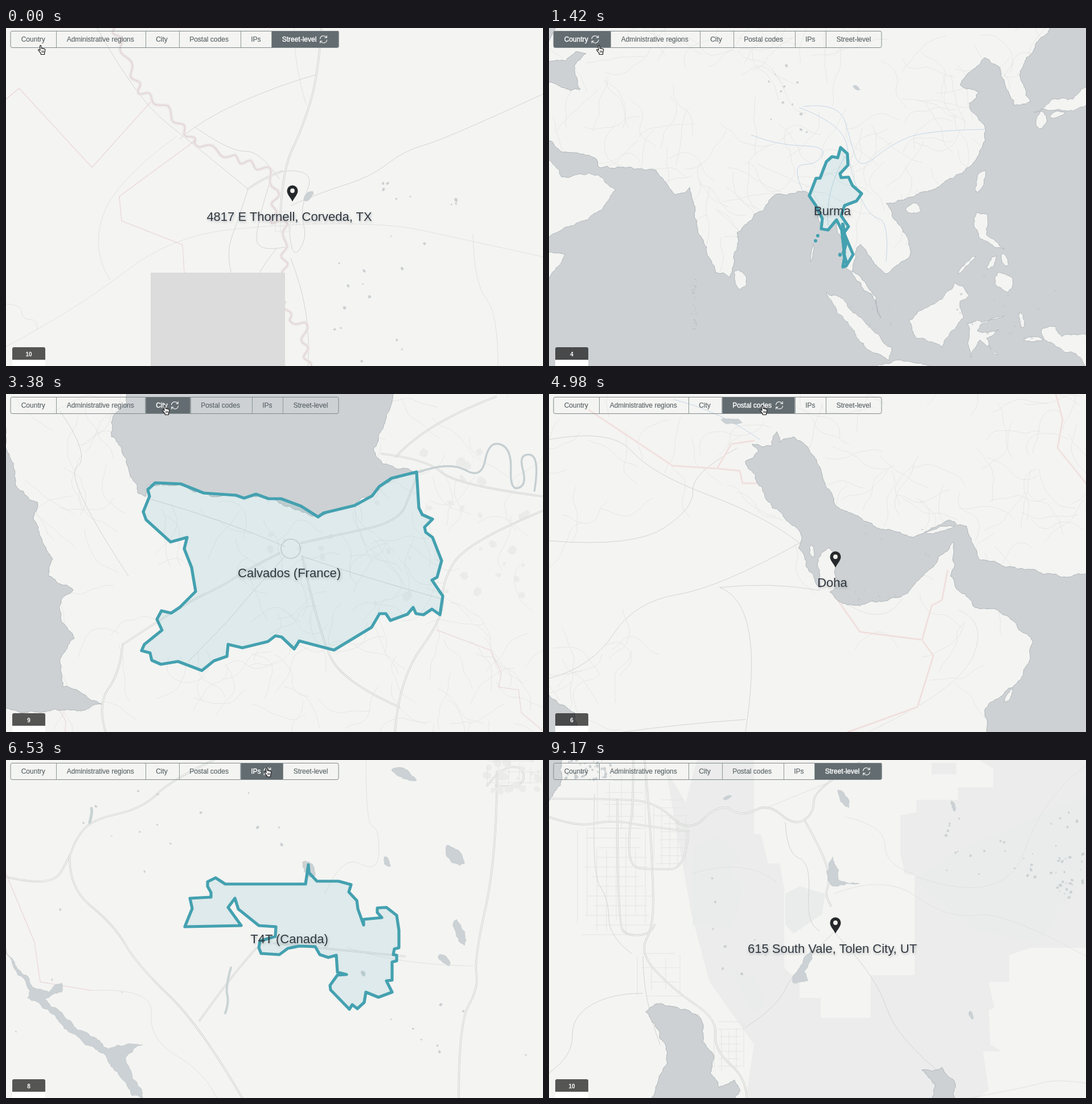
These frames come from a looping animation (943x594 px, 9.86 s). An HTML page:

```html
<!DOCTYPE html>
<html lang="en">
<head>
<meta charset="utf-8">
<title>Map layers</title>
<style>
html, body { margin: 0; width: 100%; height: 100%; overflow: hidden; background: #dcdcdc; }
svg { display: block; width: 100vw; height: 100vh; font-family: "Liberation Sans", Arial, sans-serif; }
.label { font-size: 22px; fill: #303840; text-anchor: middle; filter: drop-shadow(1px 2px 2px rgba(30, 40, 50, .3)); }
.bar text { font-size: 12px; fill: #596265; stroke: #596265; stroke-width: .15; }
.bar .on { fill: #fff; stroke: #fff; stroke-width: .4; }
.zoom { font-size: 10px; font-weight: bold; fill: #fff; text-anchor: middle; }
path { stroke-linejoin: round; stroke-linecap: round; }
</style>
</head>
<body>
<svg id="stage" viewBox="0 0 943 594"></svg>
<script>
const W = 943, H = 594, LOOP = 9860;
const LAND = '#f4f4f2', SEA = '#cdd1d4', COAST = '#a9b0b4', TEAL = '#44a1b0', GAP = '#dcdcdc';

let seed = 1, out = '';
const rnd = () => {
  seed = (seed * 16807) % 2147483647;
  return seed / 2147483647;
};
const fix = v => v.toFixed(1);
const pts = s => s.match(/\S+ \S+/g).map(q => q.split(' ').map(Number));
const poly = p => 'M' + p.map(q => q.map(fix)).join('L');
const outside = ([x, y]) => x < 0 || y < 0 || x > W || y > H;

// Coastline: midpoint displacement
function split(a, b, list) {
  const dx = b[0] - a[0], dy = b[1] - a[1], len = Math.hypot(dx, dy);
  if (len < 5 || (outside(a) && outside(b))) return list.push(b);
  const k = (rnd() - .5) * Math.min(.3, 9 / len);
  const m = [(a[0] + b[0]) / 2 - dy * k, (a[1] + b[1]) / 2 + dx * k];
  split(a, m, list);
  split(m, b, list);
}
function rough(p) {
  const list = [];
  p.forEach((a, i) => split(a, p[(i + 1) % p.length], list));
  return poly(list) + 'Z';
}
function smooth(p) {
  if (p.length < 3) return poly(p);
  let d = 'M' + p[0].map(fix);
  for (let i = 1; i < p.length - 1; i++) {
    const a = p[i], b = p[i + 1], end = i === p.length - 2;
    d += 'Q' + a.map(fix) + ' ' + (end ? b : [(a[0] + b[0]) / 2, (a[1] + b[1]) / 2]).map(fix);
  }
  return d;
}
// Sine wave carried along a polyline
function meander(p, amp) {
  const list = [];
  let s = 0;
  for (let i = 1; i < p.length; i++) {
    const [x, y] = p[i - 1], dx = p[i][0] - x, dy = p[i][1] - y, len = Math.hypot(dx, dy);
    for (let t = 0; t < len; t += 3, s += 3) {
      const o = Math.sin(s / 6 + Math.sin(s / 19)) * amp / len;
      list.push([x + dx * t / len - dy * o, y + dy * t / len + dx * o]);
    }
  }
  return poly(list);
}
function ring(x, y, rx, ry, deg, n = 9) {
  const c = Math.cos(deg * Math.PI / 180), s = Math.sin(deg * Math.PI / 180);
  return Array.from({ length: n }, (_, i) => {
    const a = i / n * 2 * Math.PI, r = .8 + rnd() * .4, u = Math.cos(a) * rx * r, v = Math.sin(a) * ry * r;
    return [x + u * c - v * s, y + u * s + v * c];
  });
}
const put = (d, stroke, w = 1, fill = 'none', more = '') =>
  out += `<path d="${d}" stroke="${stroke}" stroke-width="${w}" fill="${fill}" ${more}/>`;
const dotted = 'stroke-dasharray=".1 3"';

const sea = s => put(rough(pts(s)), COAST, .9, SEA);
const land = s => put(rough(pts(s)), COAST, .8, LAND);
const isle = (...a) => put(rough(ring(...a)), COAST, .8, LAND);
const lake = (...a) => put(rough(ring(...a)), '#bcc4c8', .6, '#cbd1d4');
const water = s => put(rough(pts(s)), '#bcc4c8', .6, '#cbd1d4');
const park = (s, tone = '#ebeceb') => put(poly(pts(s)) + 'Z', 'none', 0, tone);
const road = s => put(smooth(pts(s)), '#d3d5d4');
const lane = s => put(smooth(pts(s)), '#dfe0df', .9);
const highway = s => { const d = smooth(pts(s)); put(d, '#cccfce', 3.2); put(d, LAND, 1.6); };
const river = (s, tone = '#c3d6e8', w = 1) => put(smooth(pts(s)), tone, w);
const border = s => { const d = poly(pts(s)); put(d, '#f3e9e7', 3.5); put(d, '#ead3d0', .9); };
const dots = s => put(poly(pts(s)), '#e2c6c5', 1.7, 'none', dotted);
const bends = s => { const d = meander(pts(s), 5.5); put(d, '#ebe9e8', 6); put(d, '#dcbcbc', 1.7, 'none', dotted); };
const area = s => put(poly(pts(s)) + 'Z', TEAL, 5.2, 'rgba(68,161,176,.12)');
const thick = s => put(poly(pts(s)), TEAL, 6);

function web(x, y, w, h, n) {
  let d = '';
  while (n--) {
    let px = x + rnd() * w, py = y + rnd() * h, turn = rnd() * 6.28;
    const p = [];
    for (let i = 0; i < 9; i++) {
      p.push([px, py]);
      turn += (rnd() - .5) * 1.3;
      px += Math.cos(turn) * 13;
      py += Math.sin(turn) * 13;
    }
    d += smooth(p);
  }
  put(d, '#e3e4e3', .8);
}
function scatter(x, y, w, h, n, size) {
  let d = '';
  while (n--) {
    const r = size * (.4 + rnd());
    d += poly(ring(x + rnd() * w, y + rnd() * h, r, r * .8, rnd() * 180, 6)) + 'Z';
  }
  return d;
}
const ponds = (...a) => put(scatter(...a, 2.2), '#c3c9cc', .4, '#cbd0d3');
const towns = (...a) => put(scatter(...a, 7), 'none', 0, '#ebecea');
const islets = (...a) => put(scatter(...a, 1.6), COAST, .6, '#e6e8e8');
function grid(x, y, w, h, step) {
  let d = '';
  for (let i = 0; i <= w; i += step) d += `M${x + i} ${y + rnd() * h * .3}V${y + h - rnd() * h * .2}`;
  for (let j = 0; j <= h; j += step) d += `M${x + rnd() * w * .3} ${y + j}H${x + w - rnd() * w * .2}`;
  put(d, '#e2e3e2', .9);
}

function borderTown() {
  road('160 0 230 125 330 205 425 283');
  road('545 82 480 100 345 160 305 195');
  road('943 116 770 196 700 215 640 262 555 288 500 312');
  road('333 175 395 218 445 215 480 265');
  road('425 283 405 345 387 392 395 430');
  highway('425 283 450 264 484 252');
  road('484 252 545 245 515 320 530 370 500 410 497 345');
  lane('0 560 130 490 290 365 500 343 680 345 760 362 943 402');
  lane('820 362 822 450 864 500 864 594');
  lane('300 190 190 270 150 390 182 442');
  lane('506 0 505 60 527 135');
  road('465 265 440 345 440 395 490 385');
  road('500 405 538 500 530 594');
  road('475 388 460 405 445 430');
  lane('0 485 27 486 28 512 55 512 55 530');
  highway('554 0 548 85 521 175 485 250 482 330');
  grid(473, 322, 28, 40, 9);
  bends('190 0 235 110 280 140 330 200 400 228 460 250 475 285 468 338 494 345 488 385 490 430');
  bends('490 482 498 512 524 520 524 555 531 594');
  dots('0 125 23 106 151 245 254 130');
  dots('332 198 199 296 203 339 310 381 313 430');
  lake(530, 296, 11, 5, -45);
  ponds(655, 270, 60, 35, 6);
  ponds(770, 295, 25, 20, 4);
  ponds(575, 360, 160, 230, 14);
  out += `<rect x="254" y="430" width="236" height="164" fill="${GAP}"/>`;
}

function asia() {
  web(0, 0, 943, 330, 125);
  web(240, 230, 400, 150, 32);
  river('355 188 400 206 490 208 470 240 425 240 446 288');
  river('447 138 510 130 530 200 545 250 600 205 660 180 765 178');
  river('440 140 520 170 528 250 560 330 598 340 592 410');
  river('520 225 485 285 490 347');
  sea('-9 188 18 214 80 228 88 245 188 250 222 293 247 280 260 340 292 430 318 438 330 390 330 360 395 295 455 290 480 355 505 342 516 375 520 420 552 460 575 480 582 510 574 472 532 428 547 380 590 432 607 420 634 400 632 375 592 308 672 285 742 242 767 180 738 132 755 112 722 100 765 52 792 70 818 136 845 130 828 75 885 -9 952 -9 952 603 -9 603');
  land('-9 222 22 262 85 258 117 285 92 320 -9 370');
  land('-9 400 28 398 -9 465');
  sea('-9 60 28 58 46 42 65 45 44 66 55 108 -9 95');
  sea('-9 -9 16 -9 -9 40');
  isle(335, 442, 18, 10, 70);
  land('487 465 510 472 580 540 602 562 597 584 545 550');
  land('632 515 680 482 713 448 738 470 722 480 728 510 690 562 645 545');
  land('735 520 800 505 757 522 752 532 790 530 768 545 788 575 757 548 740 580');
  isle(625, 600, 50, 14, 5);
  isle(758, 268, 19, 8, 105);
  isle(640, 318, 13, 9, -20);
  land('750 325 770 328 768 362 800 388 755 367 746 345');
  isle(800, 446, 20, 15, 40);
  isle(778, 412, 13, 5, 120);
  isle(800, 407, 13, 5, 70);
  isle(733, 416, 25, 3, -47);
  isle(863, 163, 16, 9, 100);
  land('852 148 885 125 920 125 952 92 952 130 910 146');
  isle(891, 152, 13, 5, -15);
  land('865 530 890 525 900 542 952 540 952 603 925 572 870 548');
  isle(830, 513, 16, 5, 80);
  isle(850, 547, 15, 4, 0);
  isle(462, 396, 17, 2, 100);
  islets(250, 440, 10, 90, 30);
  islets(700, 430, 200, 120, 22);
  islets(525, 490, 80, 40, 8);
  ponds(380, 50, 80, 135, 12);
  lake(540, 105, 6, 3, 30);
}
function burma() {
  area('512 210 524 221 525 241 511 256 513 263 526 262 533 277 549 291 540 304 519 312 513 330 526 349 518 360 534 398 522 418 516 420 519 402 514 355 505 337 490 355 478 353 480 335 468 311 457 295 469 264 476 264 487 235 497 226 507 228');
  thick('516 345 521 380 517 395 523 415');
  thick('472 365 472 365');
  thick('468 374 468 374');
  thick('511 398 511 399');
}

function normandy() {
  web(60, 0, 150, 560, 28);
  web(240, 170, 520, 420, 64);
  web(640, 0, 300, 590, 48);
  towns(640, 80, 300, 300, 34);
  towns(440, 235, 130, 70, 8);
  road('255 185 385 222 490 268');
  road('520 285 620 320 765 360');
  road('490 285 430 350 390 400 320 470');
  road('95 30 150 110 100 145 215 320');
  highway('518 262 570 250 690 225 712 170 721 145');
  highway('205 440 310 370 385 335 420 310 480 280');
  highway('175 594 160 545 200 490 205 440');
  highway('943 205 810 260 765 330 770 390 690 500 683 594');
  highway('520 285 550 420 590 505 690 550');
  highway('660 105 740 115 790 160 943 180');
  highway('685 110 740 50 860 5');
  out += `<circle cx="500" cy="272" r="17" fill="none" stroke="#cccfce" stroke-width="1.5"/>`;
  sea('210 -9 212 15 185 50 185 75 215 130 232 175 246 180 250 160 308 158 350 175 420 182 470 185 548 215 600 200 650 172 680 148 721 137 660 122 645 97 688 -9');
  sea('-9 30 20 165 55 190 48 220 82 290 75 320 118 345 98 360 97 400 120 430 95 465 100 515 168 545 60 560 -9 555');
  river('725 137 780 118 835 150 848 82 888 95 885 170 915 160 900 105 938 108 928 170', '#c6cfd2', 3.5);
  dots('757 415 850 450 870 490 865 515 900 520 905 560 943 592');
  dots('92 552 105 575 104 594');
}
const calvados = () =>
  area('249 168 262 156 307 158 347 174 404 178 418 183 439 176 461 184 483 184 518 197 548 216 558 209 612 196 643 179 655 163 677 148 721 137 725 200 731 212 749 220 735 234 737 243 749 252 765 293 757 322 748 327 767 355 762 388 748 378 733 388 720 386 715 375 705 387 675 398 667 386 656 386 642 410 576 450 515 434 506 448 484 427 473 425 460 435 415 446 390 440 388 461 365 469 344 486 302 470 272 475 256 468 253 455 238 451 243 440 274 415 265 396 273 381 290 385 305 375 333 347 326 305 313 272 318 252 289 260 246 221 241 207 252 180');

function gulf() {
  web(0, 30, 400, 200, 20);
  web(420, 0, 520, 290, 60);
  web(0, 440, 130, 150, 14);
  web(540, 370, 270, 180, 7);
  road('0 80 110 60 180 140 380 215 440 262');
  road('0 258 150 270 255 200 250 140 330 95');
  road('440 262 300 340 150 365 75 480 0 500');
  road('300 340 380 370 345 594');
  road('475 345 390 330 300 340');
  road('130 594 230 580 345 572');
  lane('510 360 585 415 620 360');
  lane('720 380 770 400 720 520 560 594');
  border('70 28 217 126 295 131 320 88 360 82');
  border('295 131 335 135 340 157 375 157');
  border('502 355 546 418 655 432 675 460 647 550 525 594');
  border('655 432 672 372 690 362 700 310');
  border('890 0 902 45 893 95 943 157');
  river('220 10 300 30 370 80');
  lake(320, 48, 20, 4, 5);
  sea('357 88 368 100 345 118 375 165 392 200 442 245 438 270 470 335 477 340 471 300 480 278 492 270 504 282 507 330 493 348 515 368 595 363 630 350 660 315 710 260 705 320 745 373 805 390 850 435 843 470 815 515 765 555 770 603 952 603 952 318 910 322 755 290 733 232 705 222 640 252 575 235 500 190 470 120 445 85 430 75 405 85 400 66 392 90');
  isle(462, 276, 11, 4, 85);
  isle(688, 238, 26, 4, -15);
  isle(807, 531, 12, 4, -60);
  islets(540, 230, 140, 55, 8);
  islets(530, 345, 100, 18, 8);
  sea('-9 520 45 560 50 603 -9 603');
}

function prairie() {
  lane('632 0 632 115 655 118 655 200 590 165 560 235');
  lane('600 330 690 360 820 362');
  dots('0 200 50 320 60 390 150 405');
  lane('150 405 260 400 250 490 350 550 370 594');
  highway('0 205 80 225 112 170 122 140 150 105 240 85 290 35 365 0');
  highway('112 170 110 225 190 290 230 360 340 465 415 594');
  highway('440 330 395 380 340 458');
  highway('470 322 600 335 700 345');
  highway('862 20 862 170 822 350 830 400 795 462 795 594');
  highway('845 45 870 12 910 12 908 50 860 45');
  towns(840, 0, 100, 55, 22);
  grid(845, 2, 95, 48, 19);
  river('395 365 385 400 392 425 385 445', '#c9d3d4', 4);
  river('150 85 152 90 147 110', '#c9d3d4', 5);
  water('-9 325 28 375 48 400 75 408 98 392 98 408 68 420 115 460 180 508 240 500 210 525 222 560 240 594 222 590 178 525 102 472 85 448 38 418 42 405');
  lake(788, 168, 20, 11, 40);
  lake(796, 300, 23, 8, 70);
  lake(770, 351, 15, 6, 40);
  lake(669, 179, 10, 5, 70);
  lake(697, 24, 22, 8, 25);
  lake(530, 190, 17, 9, 60);
  lake(627, 375, 5, 3, 70);
  ponds(230, 40, 260, 120, 10);
  ponds(560, 420, 360, 150, 8);
  ponds(0, 80, 250, 400, 8);
}
const postcode = () =>
  area('314 293 327 261 323 243 360 241 360 233 354 222 354 214 368 207 385 218 526 218 531 184 532 198 546 213 584 213 606 219 602 232 616 247 618 262 628 290 628 280 660 277 652 268 652 260 668 259 686 273 690 299 690 330 682 332 680 342 686 343 686 353 678 355 678 387 668 388 678 408 654 417 632 408 629 426 617 437 608 430 603 438 570 404 569 396 582 378 598 377 582 373 580 343 566 347 551 342 543 328 515 327 495 331 480 342 448 340 444 330 446 318 473 310 474 293 444 291 408 262 402 243 390 259 413 291');

function rhine() {
  web(0, 40, 190, 280, 20);
  web(190, 280, 380, 310, 75);
  web(400, 120, 330, 460, 70);
  web(640, 80, 300, 510, 46);
  web(0, 410, 300, 180, 20);
  towns(0, 80, 150, 240, 26);
  towns(210, 270, 230, 80, 45);
  towns(205, 435, 40, 30, 14);
  towns(470, 350, 60, 120, 14);
  towns(670, 190, 40, 35, 12);
  towns(100, 260, 35, 30, 12);
  road('130 420 225 450 300 400 420 340');
  road('690 205 600 290 500 300');
  road('480 420 600 490 720 480');
  border('232 310 250 330 350 355 375 410 450 440');
  border('425 130 420 200 385 210 392 250 365 270 378 370');
  border('735 125 742 235 725 265 748 290 725 310 640 335 645 380 700 445 770 460 870 420 943 375');
  border('700 450 640 520 530 540 450 525 400 570 370 594');
  border('830 450 840 490 815 530 790 594');
  river('300 245 400 250 420 320 490 390 440 500 445 528 500 528');
  river('470 500 560 475 650 430 710 490 830 485 890 520 925 515 925 594');
  river('145 408 190 440 265 475 300 465 320 525');
  river('728 125 715 185 760 240 800 250 805 290 890 350 882 400');
  sea('65 -9 85 60 110 80 130 130 115 120 138 160 135 185 185 177 198 210 165 262 185 288 180 305 70 338 -9 330 -9 465 60 462 45 395 72 410 75 420 130 405 190 360 193 320 265 285 300 262 290 250 318 218 322 185 345 150 410 140 425 125 465 120 475 145 487 115 522 110 497 60 488 -9');
  sea('540 -9 552 25 540 45 570 65 580 105 650 90 680 58 700 92 725 108 770 95 815 65 895 43 905 70 952 78 952 -9');
  isle(595, 15, 26, 16, 60);
  isle(638, 10, 22, 12, -60);
  isle(610, 46, 20, 8, 15);
  lake(353, 195, 22, 13, 60);
  isle(349, 155, 20, 4, -25);
  isle(287, 268, 15, 3, -20);
  isle(289, 280, 14, 3, -15);
  islets(390, 125, 65, 12, 6);
  lake(518, 525, 17, 4, 30);
  lake(867, 574, 21, 4, -25);
  lake(726, 118, 14, 7, 20);
  ponds(600, 100, 150, 120, 9);
  islets(10, 395, 25, 40, 4);
  sea('-9 520 30 545 -9 550');
}

function valley() {
  park('205 15 240 75 262 -9 360 -9 360 130 372 130 385 182 405 182 413 225 413 365 440 392 440 418 477 418 477 453 565 453 565 378 642 378 642 203 625 200 617 165 617 97 645 92 645 70 718 70 718 48 780 48 780 15 740 -9 952 -9 952 330 845 330 808 343 808 390 772 390 782 435 772 440 775 500 795 512 762 512 772 580 740 603 345 603 360 500 282 390 250 270');
  park('672 5 715 5 715 25 672 25');
  const green = '#e9eceb';
  park('255 150 300 135 335 170 318 195 340 230 320 295 252 290', green);
  park('415 235 440 222 485 235 480 270 430 305 415 290', green);
  park('320 370 360 380 378 430 360 442', green);
  park('640 210 720 160 943 60 943 200 860 320 750 300', green);
  grid(50, 120, 130, 190, 17);
  grid(184, 70, 60, 120, 14);
  grid(85, 15, 90, 110, 21);
  grid(290, 460, 52, 90, 13);
  grid(155, 340, 80, 75, 25);
  road('80 60 75 200 105 245 105 310 145 340');
  road('0 550 42 520 40 450 110 410 165 410');
  road('165 345 165 420 195 500');
  road('503 300 430 370 400 435 345 470');
  road('503 305 575 380 610 490 700 560');
  road('415 110 418 165 460 180 452 290 475 300');
  lane('500 235 590 200 700 280 800 265 943 345');
  lane('520 100 590 115 590 185 640 200');
  lane('250 200 345 170 400 215');
  lane('740 594 840 575 890 560 943 568');
  lane('380 85 440 60 495 38');
  lane('645 205 800 260 870 60 943 10');
  highway('0 68 120 68 190 75 245 130 300 75 340 100 385 76 430 116 465 95 465 50 545 5');
  highway('0 100 50 118 110 105 180 118 245 125');
  highway('168 0 175 80 182 190 184 290 158 340 220 405 295 455 290 510 347 560 347 594');
  highway('148 0 148 80 140 130 142 190 185 192 240 192 245 125');
  highway('450 108 485 170 493 215 484 238 495 256');
  highway('120 70 120 290 140 310 180 305 185 290');
  sea('170 443 185 430 245 440 268 458 270 495 290 520 283 550 298 575 325 562 335 582 320 603 172 603 190 570 208 515 195 490');
  sea('-9 -9 25 -9 20 45 -9 80');
  ponds(30, 0, 80, 35, 45);
  water('492 180 499 170 508 192 510 212 545 217 500 222 490 212');
  water('460 335 462 350 448 372 455 388 428 391 440 365');
  sea('655 545 690 540 712 565 710 603 668 603 678 570');
  lake(517, 66, 17, 7, 60);
  lake(710, 81, 9, 3, 75);
  lake(741, 448, 8, 3, 70);
  lake(313, 66, 7, 3, -20);
  ponds(690, 85, 250, 130, 32);
  ponds(890, 165, 50, 80, 24);
  ponds(280, 170, 100, 230, 8);
}

const none = () => {};
const scenes = [
  { z: 10, text: '4817 E Thornell, Corveda, TX', map: borderTown, from: 0, to: 0, n: 1 },
  { z: 4, text: 'Burma', y: 329, map: asia, shape: burma, from: 180, to: 740, n: 5 },
  { z: 9, text: 'Calvados (France)', y: 322, map: normandy, shape: calvados, from: 1980, to: 2460, n: 4 },
  { z: 6, text: 'Doha', map: gulf, from: 3560, to: 4030, n: 4 },
  { z: 8, text: 'T4T (Canada)', y: 322, map: prairie, shape: postcode, from: 5250, to: 5580, n: 1 },
  { z: 6, text: '77.2.53.14', map: rhine, from: 6620, to: 6970, n: 3 },
  { z: 10, text: '615 South Vale, Tolen City, UT', map: valley, from: 8430, to: 9170, n: 7 }
];
const clicks = [[0, 5], [90, 0], [1870, 1], [3380, 2], [4980, 3], [6530, 4], [8340, 5]];
const moves = [ // start, end, steps, x, y
  [1420, 1420, 1, 83, 30], [1510, 1870, 4, 160, 20], [2760, 3320, 5, 274, 20], [3850, 4530, 6, 370, 20],
  [5880, 6430, 5, 453, 13], [7300, 7800, 5, 504, 19], [8430, 9080, 6, 560, -25]];
const tabs = [['Country', 80], ['Administrative regions', 156.5], ['City', 59], ['Postal codes', 108], ['IPs', 54.5], ['Street-level', 98.5]];

const pin = `<path d="M503 305C500 298 493.5 293 493.5 286A9.5 9.5 0 1 1 512.5 286C512.5 293 506 298 503 305Z" fill="#25292c"/><circle cx="503" cy="286" r="3.9" fill="${LAND}"/>`;

function bar(on) {
  let x = 8, html = '';
  tabs.forEach(([name, w], i) => {
    const sel = i === on, full = w + (sel ? 20 : 0);
    if (sel) html += `<rect x="${x}" y="5" width="${full}" height="29.5" rx="2" fill="#636c70"/>` +
      `<path transform="translate(${x + full - 27} 20)" d="M-6-1A6 6 0 0 1 5-3.5M6 1A6 6 0 0 1-5 3.5M5.8-6.5V-3H2.2M-5.8 6.5V3H-2.2" fill="none" stroke="#fff" stroke-width="1.1"/>`;
    if (i) html += `<path d="M${Math.round(x) + .5} 5.5V34.5" stroke="#8d9697"/>`;
    html += `<text x="${x + 18.7}" y="24" class="${sel ? 'on' : ''}">${name}</text>`;
    x += full;
  });
  return html + '<rect x="8" y="5.5" width="576" height="29" rx="3" fill="none" stroke="#7f898b"/>';
}
function render(fn) {
  out = '';
  fn();
  return out;
}

let tiles = '';
for (let r = 0; r < 3; r++) for (let c = 0; c < 4; c++)
  tiles += `<rect x="${c * 256 - 22}" y="${r * 256 - 82}" width="256" height="256" fill="${GAP}"/>`;

const $ = id => document.getElementById(id);
$('stage').innerHTML = scenes.map((s, i) => {
  seed = 977 * (i + 3);
  return `<g id="map${i}"><rect width="943" height="594" fill="${LAND}"/>${render(s.map)}</g>`;
}).join('') + `<g id="tiles">${tiles}</g>` + scenes.map((s, i) =>
  `<g id="over${i}">${s.shape ? render(s.shape) : pin}<text class="label" x="497.5" y="${s.y || 339}">${s.text}</text></g>`
).join('') + `<g id="bar" class="bar"></g>
<path d="M11 583V564Q11 561 14 561H66Q69 561 69 564V583Z" fill="rgba(0,0,0,.65)"/>
<rect x="11" y="583" width="58" height="11" fill="#fff"/><path d="M55 594.5h1" stroke="#555"/>
<text id="zoom" class="zoom" x="40" y="576.5"></text>
<g id="hand" stroke="#111"><path d="M3.5 1.5Q4.7-.3 5.8 1.5L6.3 6Q7.6 4.8 8.5 6.4 9.8 5.4 10.7 6.9 12.4 6.3 12.7 7.9 13 11 11.6 13.6V16.5H5.3V14.6L.8 9.2Q.5 6.6 2.5 7.9L4 9.4Z" fill="#fff" stroke-width="1.1"/><path d="M6.8 10v3m1.8-3v3m1.8-3v3" stroke-width=".8"/></g>`;

const covers = [...$('tiles').children];
const delays = covers.map((_, i) => (i * 5 % 12) / 11 * .6);
const prog = (t, a, b, n) => t < a ? 0 : t >= b ? 1 : (Math.floor((t - a) / (b - a) * n) + 1) / (n + 1);
let shown = -1, picked = -1;

function show(t) {
  const i = scenes.findLastIndex(s => t >= s.from), s = scenes[i];
  if (i !== shown) {
    scenes.forEach((_, j) => ['map', 'over'].forEach(k => $(k + j).style.display = j === i ? '' : 'none'));
    $('zoom').textContent = s.z;
    shown = i;
  }
  const p = prog(t, s.from, s.to, s.n) * 1.6;
  covers.forEach((c, j) => c.setAttribute('opacity', 1 - Math.min(1, Math.max(0, p - delays[j]))));

  const on = clicks.findLast(c => t >= c[0])[1];
  if (on !== picked) $('bar').innerHTML = bar(picked = on);

  let x = 56, y = 30;
  for (const [a, b, n, mx, my] of moves) {
    const k = prog(t, a, b, n);
    x += (mx - x) * k;
    y += (my - y) * k;
  }
  $('hand').setAttribute('transform', `translate(${fix(x)} ${fix(y)})`);
}

const start = performance.now();
function tick() {
  show((performance.now() - start) % LOOP);
  requestAnimationFrame(tick);
}
tick();
</script>
</body>
</html>
```
